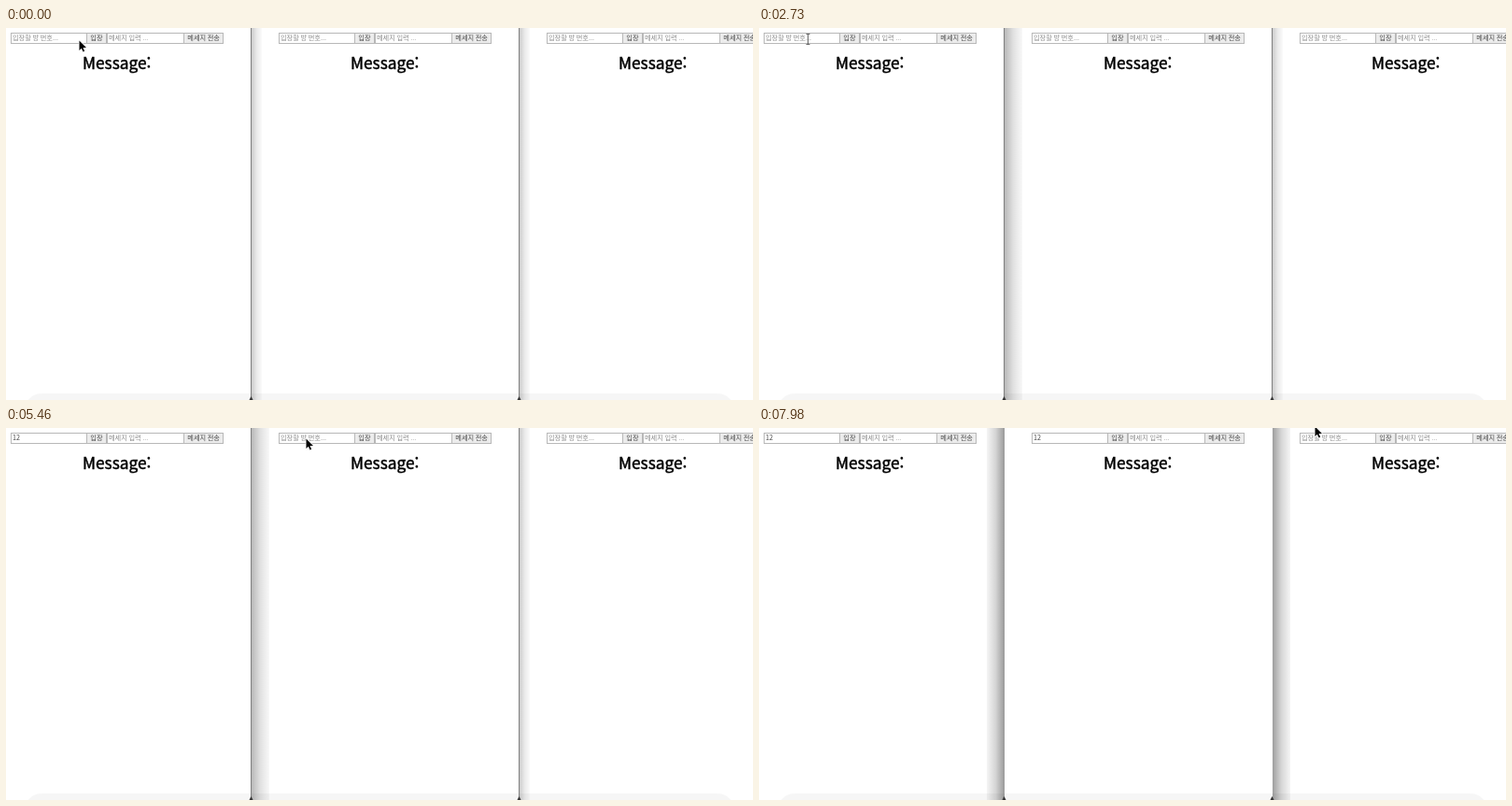
These frames come from a looping animation (800x398 px, 8 s). An HTML page with a canvas:

```html
<!DOCTYPE html>
<html lang="ko">
<head>
<meta charset="utf-8">
<style>
html, body { margin: 0; height: 100%; overflow: hidden; background: #fff; }
canvas { display: block; }
</style>
</head>
<body>
<canvas width="800" height="398"></canvas>
<script>
const ctx = document.querySelector('canvas').getContext('2d');
const FONT = '"Noto Sans CJK KR", "Noto Sans CJK", sans-serif';
const LOOP = 8000, STEP = 70, PANE = 287, EDGE = 262;
const LEFT_ACTIVE = 2380, MIDDLE_ACTIVE = 5530;

const rooms = [
  { focus: 2940, type: 3570, blur: 4410 },
  { focus: 5810, type: 6160, blur: 7070 },
  { focus: LOOP, type: LOOP, blur: LOOP }
];

// The pointer rests between moves
const moves = [
  { start: 2100, end: 2870, x: 50, y: 12 },
  { start: 3780, end: 4060, x: 95, y: 11 },
  { start: 4830, end: 4970, x: 110, y: 27 },
  { start: 5250, end: 5460, x: 321, y: 11 },
  { start: 6440, end: 6790, x: 384, y: 11 },
  { start: 7630, end: 7980, x: 595, y: -2 }
];

const pointerArrow = new Path2D('M.5 .5V11L2.8 8.7 4.6 12.5 6.2 11.8 4.5 8H8Z');

const between = (t, a, b) => t >= a && t < b;
const clamp = v => Math.min(1, Math.max(0, v));
const smooth = k => k * k * (3 - 2 * k);

function rect(x, y, w, h, color) {
  ctx.fillStyle = color;
  ctx.fillRect(x, y, w, h);
}

function text(str, x, y, size, color) {
  ctx.font = `${size}px ${FONT}`;
  ctx.fillStyle = color;
  ctx.fillText(str, x, y);
  return ctx.measureText(str).width;
}

function shadow(x, width, alpha) {
  const g = ctx.createLinearGradient(x, 0, x + width, 0);
  [1, 0.42, 0.1].forEach((k, i) => g.addColorStop(i / 2, `rgba(0,0,0,${alpha * k})`));
  rect(x, 0, width, 398, g);
}

function windows(t) {
  const middle = t >= MIDDLE_ACTIVE, left = t >= LEFT_ACTIVE && !middle;
  shadow(EDGE + 1, middle ? -19 : left ? 19 : 11, middle ? 0.4 : left ? 0.28 : 0.2);
  shadow(EDGE + 1 + PANE, middle ? 19 : 11, middle ? 0.38 : 0.2);
  ctx.fillStyle = 'rgba(0,0,0,.035)';
  ctx.beginPath();
  ctx.roundRect(20, 391, 760, 40, 18);
  ctx.fill();
  for (const x of [EDGE, EDGE + PANE]) {
    if (!middle) rect(x, 0, 1, 398, '#808080');
    ctx.fillStyle = '#333';
    ctx.fill(new Path2D(`M${x + 0.5} 394l2 4h-4z`));
  }
}

function pane(t, room, index) {
  const focused = between(t, room.focus, room.blur);
  const value = '12'.slice(0, t < room.type ? 0 : (t - room.type) / STEP + 1);
  ctx.save();
  ctx.translate(index * PANE, 0);

  let x = 5;
  const box = (width, label, button, color = button ? '#484848' : '#8c8c8c') => {
    rect(x, 5, width, 12, '#b8b8b8');
    rect(x + 1, 6, width - 1 - button, 10, button ? '#ececec' : '#fff');
    const end = x + 2 + text(label, x + (button ? 4.3 : 2), 13.4, 7.2, color);
    x += width;
    return end;
  };
  const caret = value ? box(81, value, 0, '#444') : (box(81, '입장할 방 번호...', 0), 7);
  box(22, '입장', 1);
  box(82, '메세지 입력 ...', 0);
  box(43, '메세지 전송', 1);

  if (focused) {
    ctx.strokeStyle = '#7486d2';
    ctx.lineWidth = 1;
    ctx.strokeRect(5.5, 5.5, 81, 11);
    rect(Math.round(caret), 7, 1, 8, '#777');
  }

  // A thin outline gives the heading its medium weight
  text('Message:', 82, 44, 17.3, '#000');
  ctx.strokeStyle = '#000';
  ctx.lineWidth = 0.45;
  ctx.strokeText('Message:', 82, 44);
  ctx.restore();
}

function arrow(x, y) {
  ctx.save();
  ctx.translate(x, y);
  ctx.lineWidth = 1.5;
  ctx.lineJoin = 'round';
  ctx.strokeStyle = '#fff';
  ctx.stroke(pointerArrow);
  ctx.fillStyle = '#000';
  ctx.fill(pointerArrow);
  ctx.restore();
}

function beam(x, y) {
  ctx.strokeStyle = '#666';
  ctx.lineWidth = 1;
  ctx.stroke(new Path2D(`M${Math.round(x) - 1.5} ${Math.round(y) - 5.5}h4m-2 0v11m-2 0h4`));
}

function pointer(t) {
  if (rooms.some(r => between(t, r.type, r.type + 3 * STEP))) return;
  let x = 78, y = 13;
  for (const m of moves) {
    const k = smooth(clamp((t - m.start) / (m.end - m.start)));
    x += (m.x - x) * k;
    y += (m.y - y) * k;
  }
  const overField = between(t, LEFT_ACTIVE, rooms[0].blur) && x < 86 ||
                    between(t, MIDDLE_ACTIVE + STEP, rooms[1].blur) && x < 375;
  (overField ? beam : arrow)(x, y);
}

function draw() {
  const t = Math.floor(performance.now() % LOOP / STEP) * STEP;
  rect(0, 0, 800, 398, '#fff');
  windows(t);
  rooms.forEach((room, i) => pane(t, room, i));
  pointer(t);
  requestAnimationFrame(draw);
}
draw();
</script>
</body>
</html>
```
